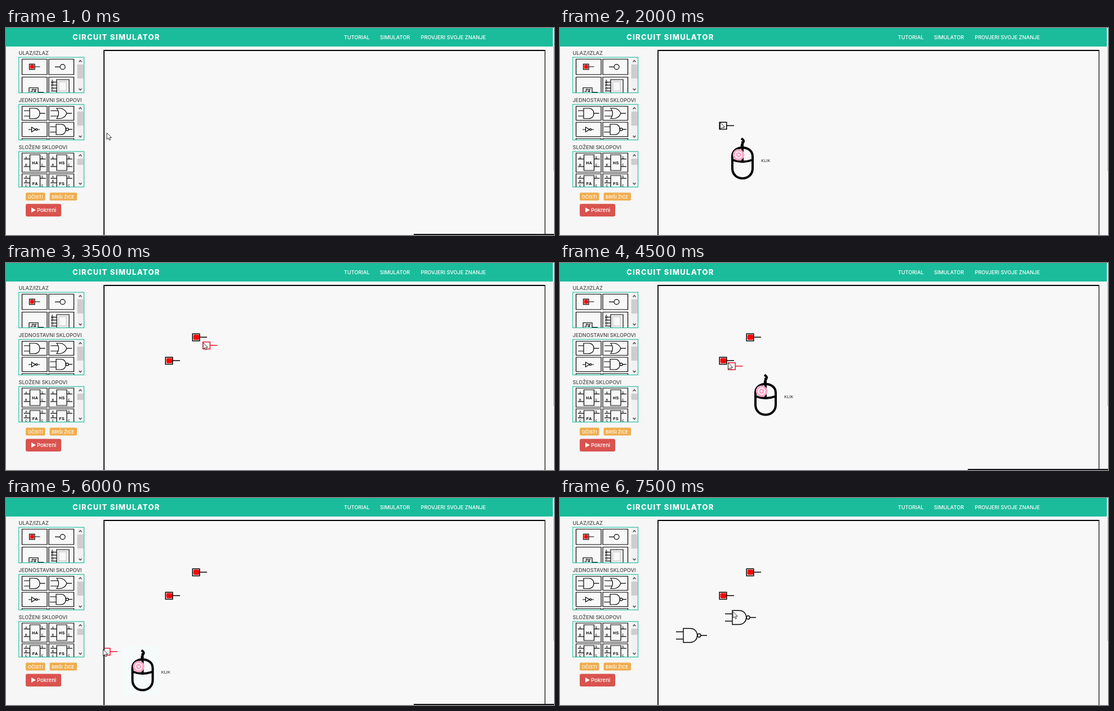
An HTML page that plays this animation: 973 by 369 pixels, repeating every 8000 ms.

```html
<!DOCTYPE html>
<html lang="hr">
<head>
<meta charset="utf-8">
<title>Circuit simulator</title>
<style>
html, body { margin: 0; width: 100%; height: 100%; overflow: hidden; background: #f6f6f6; }
svg { display: block; width: 973px; height: 369px; }
text { font-family: Inter, "Open Sans", sans-serif; }
.nav { font-size: 9.2px; font-weight: 500; fill: #fff; }
.label { font-size: 9.15px; font-weight: 500; fill: #4a4a4a; }
.line { fill: none; stroke: #000; stroke-width: 1.2; }
.pin { font: bold 5px Arial, "Liberation Sans", sans-serif; fill: #222; }
.chip { font: bold 7px Arial, "Liberation Sans", sans-serif; text-anchor: middle; letter-spacing: .5px; }
</style>
</head>
<body>
<svg viewBox="0 0 973 369">
  <defs>
    <clipPath id="board"><rect x="175" y="41" width="782" height="328"/></clipPath>
    <g id="switch" fill="none" stroke-width="1.5">
      <path d="M.7 .7H13.3V13.3H.7ZM13.3 6.7H26.5"/>
    </g>
    <path id="nand" class="line" style="stroke-width:1.4"
      d="M0 6.5H13M0 19.5H13M13 .5H25C42 .5 42 25.5 25 25.5H13ZM44 13H55M44 13a3 3 0 1 1 -6 0a3 3 0 1 1 6 0"/>
    <path id="arrow" d="M0 0V11.5L2.7 9L4.5 13L6.4 12.2L4.7 8.3H8.3Z" fill="#fff" stroke="#222" stroke-width=".9"/>
    <g id="mouse">
      <path d="M22 18V6M20 1C31 8 16 9 22 18M22 18V43" fill="none" stroke="#000" stroke-width="4"/>
      <path d="M4 33C4 12 40 12 40 33V54C40 78 4 78 4 54ZM4 39Q22 46 40 39" fill="none" stroke="#000" stroke-width="4"/>
      <circle cx="15" cy="30" r="10.3" fill="#ffa8c8"/>
      <circle cx="15" cy="30" r="5.7" fill="none" stroke="#fff" stroke-width="1.7"/>
      <circle cx="15" cy="30" r="1.8" fill="#fff"/>
      <text x="55" y="42.7" style="font:8px 'Open Sans',sans-serif" fill="#111">KLIK</text>
    </g>
  </defs>
  <rect width="973" height="369" fill="#f6f6f6"/>
  <rect x="174" y="40" width="783" height="340" fill="#f8f8f8"/>
  <rect width="971" height="33" fill="#1abc9c"/>
  <rect x="971" width="2" height="369" fill="#fafafa"/>
  <rect x="972" y="33" width="1" height="222" fill="#bbb"/>
  <text x="118" y="21" font-size="13" font-weight="800" letter-spacing="1.3" fill="#fff">CIRCUIT SIMULATOR</text>
  <text class="nav" x="600" y="19.6">TUTORIAL</text>
  <text class="nav" x="664" y="19.6">SIMULATOR</text>
  <text class="nav" x="736.5" y="19.6">PROVJERI SVOJE ZNANJE</text>
  <g id="side"></g>
  <g fill="#f0ad4e">
    <rect x="35" y="293.5" width="34.5" height="14" rx="2"/>
    <rect x="77.5" y="293.5" width="48.5" height="14" rx="2"/>
  </g>
  <rect x="35" y="313.5" width="63" height="22.5" rx="3" fill="#d9534f"/>
  <path d="M45 320V329L53 324.5Z" fill="#fff"/>
  <g fill="#fff">
    <text x="39" y="303.5" font-size="7.9" font-weight="500">OČISTI</text>
    <text x="81" y="303.5" font-size="8" font-weight="500">BRIŠI ŽICE</text>
    <text x="55" y="328" font-size="9.5" font-weight="500">Pokreni</text>
  </g>
  <path d="M174 369V40H957" fill="none" stroke="#000" stroke-width="1.8"/>
  <path d="M957 39.2V369" stroke="#222" stroke-width="1.4"/>
  <g id="scene"></g>
</svg>
<script>
const line = d => `<path class="line" d="${d}"/>`;
const box = (x, y, w, h) => line(`M${x} ${y}h${w}v${h}h${-w}Z`);
const pin = (x, y, s) => `<text class="pin" x="${x}" y="${y}">${s}</text>`;
const place = (id, x, y, extra = "") => `<use href="#${id}" x="${x}" y="${y}" ${extra}/>`;

function panel(y, title, thumb, content) {
  const id = "clip" + y;
  return `<text class="label" x="22.5" y="${y - 4}">${title}</text>
    <clipPath id="${id}"><rect x="23" y="${y}" width="115" height="63"/></clipPath>
    <g clip-path="url(#${id})">
      <rect x="23" y="${y}" width="115" height="63" fill="#f8f8f8"/>${content}
      <rect x="126.5" y="${y}" width="12" height="63" fill="#f1f1f1"/>
      <rect x="126.5" y="${y + 13}" width="11" height="${thumb}" fill="#cdcdcd"/>
      <path d="M129.6 ${y + 8.5}l2.4 -2.6l2.4 2.6M129.6 ${y + 56}l2.4 2.6l2.4 -2.6" fill="none" stroke="#444" stroke-width="1.4"/>
    </g>
    <rect x="22.7" y="${y + .2}" width="115.8" height="63.3" fill="none" stroke="#1abc9c" stroke-width="1.1"/>`;
}

const tiles = (y, h) => box(28.5, y, 44.5, h) + box(76, y, 44.5, h);

function ioIcons() {
  const pins = [..."ABCD"].map((s, i) => pin(80.5, 95.5 + i * 5.3, s) + line(`M80 ${96.5 + i * 5.3}H90`)).join("");
  return tiles(55.5, 27.5) + tiles(87.5, 40) +
    line("M41.5 64.3h9.5v9.5h-9.5ZM51 69H60.5") +
    `<rect x="42.8" y="65.4" width="7" height="7.2" rx="1.5" fill="#f00"/>` +
    line("M87 69.3H96M105 69.3a4.5 4.5 0 1 1 -9 0a4.5 4.5 0 1 1 9 0") +
    line("M41 120V106.5H57V120M57 114.7H67M43.5 113.5H46.5V109H50V113.5H52.5V109H54.5") +
    pins + box(90, 92, 22, 36) +
    `<path d="M93.5 95.5H107.5V120M93.5 95.5V120M94 112.5H107" fill="none" stroke="#ddd" stroke-width="3"/>`;
}

function gateIcons() {
  return tiles(139.5, 25) + tiles(168, 25.5) + tiles(197, 25) +
    line("M32 147.5H42M32 157H42M42 143H51C63 143 63 161.5 51 161.5H42ZM60 152.2H69.5") +
    line("M79 147.5H93M79 157H93M90 143H96Q104 143.5 108 152.2Q104 161 96 161.5H90Q97 152.2 90 143ZM108 152.2H117") +
    line("M40 181H45.5M45.5 176.8V185.2L52.5 181ZM55.7 181a1.6 1.6 0 1 1 -3.2 0a1.6 1.6 0 1 1 3.2 0M55.7 181H60") +
    line("M78 176H89M78 185.5H89M89 171.5H98C109 171.5 109 190 98 190H89ZM111 180.7a2.3 2.3 0 1 1 -4.6 0a2.3 2.3 0 1 1 4.6 0M111 180.7H118");
}

function chip(x, y, name, rows) {
  const left = rows.map((r, i) => pin(x + 5.5, y + r - 1, "ABC"[i]) + line(`M${x + 3} ${y + r}h11`)).join("");
  const right = [rows[0], rows[rows.length - 1]]
    .map((r, i) => pin(x + 34, y + r - 1, "SC"[i]) + line(`M${x + 32} ${y + r}h10`)).join("");
  return left + right + box(x + 14, y + 3, 18, 28) +
    `<text class="chip" x="${x + 23.3}" y="${y + 19.5}">${name}</text>`;
}

const chipIcons = () => tiles(223, 34) + tiles(260, 34) +
  chip(28.5, 223, "HA", [10.5, 24]) + chip(76, 223, "HS", [10.5, 24]) +
  chip(28.5, 260, "FA", [8, 16, 24]) + chip(76, 260, "FS", [8, 16, 24]);

document.getElementById("side").innerHTML =
  panel(52, "ULAZ/IZLAZ", 25, ioIcons()) +
  panel(136, "JEDNOSTAVNI SKLOPOVI", 25, gateIcons()) +
  panel(220, "SLOŽENI SKLOPOVI", 11, chipIcons());

// One pose per half second: cursor, switch being dragged, mouse hint
const STEP = 500;
const poses = [
  { cursor: [179, 187] },
  { cursor: [53, 71] },
  { cursor: [172, 125], drag: [171, 122] },
  { cursor: [262, 163], drag: [261, 161] },
  { cursor: [284.5, 168.5], hint: [302, 196] },
  { cursor: [314, 145], drag: [313, 143] },
  { cursor: [331.5, 128], hint: [387, 73.5] },
  { cursor: [350, 142], drag: [349, 140] },
  { cursor: [325, 161], drag: [324, 159] },
  { cursor: [298.5, 178], drag: [298, 177], hint: [343, 198.5] },
  { cursor: [262, 222], drag: [261, 220] },
  { cursor: [215, 270], drag: [214, 268], hint: [262, 296] },
  { cursor: [172.5, 270], drag: [171.5, 267], hint: [220.5, 270.5], halo: true },
  { cursor: [100, 181] },
  { cursor: [220, 235] },
  { cursor: [307, 202.5] }
];
const parts = [
  { id: "switch", at: [282.5, 167.2], from: 4, on: 5 },
  { id: "switch", at: [330.5, 125.5], from: 6, on: 7 },
  { id: "nand", at: [206, 232], from: 14 },
  { id: "nand", at: [293, 200], from: 15 }
];
const barSteps = [[0, 3], [8, 14]];

function draw(step) {
  const { cursor, drag, hint, halo } = poses[step];
  let out = "";
  for (const { id, at: [x, y], from, on } of parts) {
    if (step < from) continue;
    out += place(id, x, y, 'stroke="#000"');
    if (step >= on) out += `<rect x="${x + 2.2}" y="${y + 2.3}" width="10.4" height="9.2" rx="2" fill="#f00"/>`;
  }
  if (drag) out += `<g clip-path="url(#board)">${place("switch", ...drag, 'stroke="#f4172b"')}</g>`;
  if (halo) out += '<rect x="208" y="263" width="63" height="88" fill="#f5fbfa"/>';
  if (hint) out += place("mouse", ...hint);
  if (barSteps.some(([a, b]) => step >= a && step < b))
    out += '<rect x="724" y="367" width="249" height="2" fill="#151515"/>';
  return out + place("arrow", ...cursor);
}

const scene = document.getElementById("scene");
let shown = -1;
function tick(now) {
  const step = Math.floor(now / STEP) % poses.length;
  if (step !== shown) scene.innerHTML = draw(shown = step);
  requestAnimationFrame(tick);
}
tick(performance.now());
</script>
</body>
</html>
```
